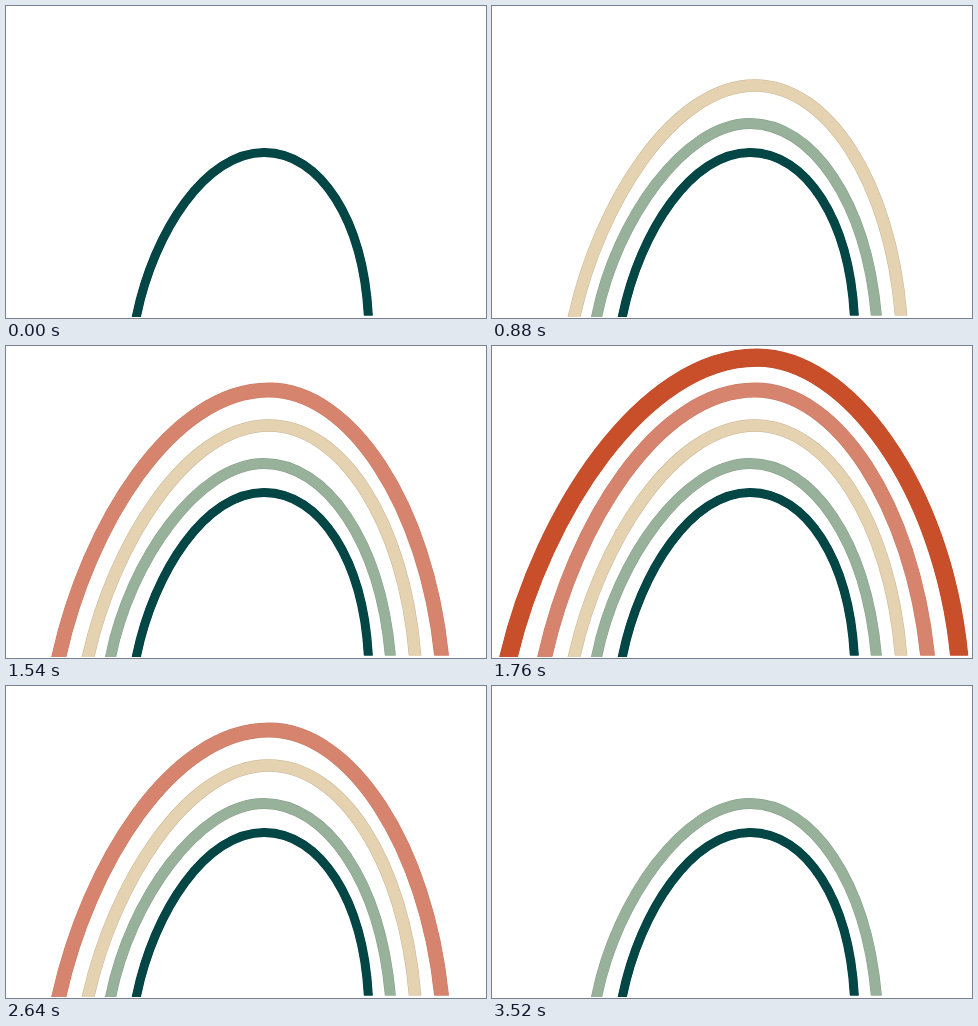
Write an HTML page that moves like this. It is 480 px wide and 312 px high and loops after 3.96 s.

```html
<!DOCTYPE html>
<html lang="en">
<head>
<meta charset="utf-8">
<title>Rainbow</title>
<style>
  html, body { margin: 0; width: 100%; height: 100%; overflow: hidden; background: #fff; }
  svg { display: block; width: 100%; height: 100%; }
  path { fill: none; }
</style>
</head>
<body>
<svg id="stage" viewBox="0 0 480 312">
  <clipPath id="ground"><path d="M0 0H480V309.6H250V311H0Z"/></clipPath>
  <g id="bows" clip-path="url(#ground)"></g>
</svg>
<script>
const LOOP = 3960;
const NS = "http://www.w3.org/2000/svg";

// Centre line: left foot, two handles, crown, two handles, right foot.
const bows = [
  { fill: "#034646", edge: "#033f40", width: 9, from: 0, to: LOOP,
    line: [130.5, 310, 148, 225, 200, 146.5, 258, 146.5, 315, 146.5, 357, 215, 362.3, 309] },
  { fill: "#98b19b", edge: "#879f8a", width: 11, from: 440, to: LOOP,
    line: [104.8, 310, 124, 215, 192, 117.5, 258, 117.5, 320, 117.5, 374, 195, 384.3, 309] },
  { fill: "#e5d2b1", edge: "#c9b595", width: 12.6, from: 880, to: 3520,
    line: [82.3, 310, 107, 200, 180, 79.5, 263, 79.5, 335, 79.5, 398, 175, 409, 309] },
  { fill: "#d6846d", edge: "#c67a64", width: 14.8, from: 1320, to: 3080,
    line: [53, 310, 82, 180, 165, 44, 263, 44, 345, 44, 420, 160, 435.5, 309] },
  { fill: "#c94f2b", edge: "#bd4a29", width: 18.2, from: 1760, to: 2640,
    line: [16.8, 310, 50, 170, 150, 11.7, 265, 11.7, 355, 11.7, 450, 140, 467, 308] }
];

// Runs both feet on below the ground line so that they are cut level.
function pathOf(p) {
  const past = (x, y, hx, hy) => [x + (x - hx) * 0.1, y + (y - hy) * 0.1];
  const start = past(p[0], p[1], p[2], p[3]);
  const end = past(p[12], p[13], p[10], p[11]);
  return `M${start}L${p.slice(0, 2)}C${p.slice(2, 8)}C${p.slice(8)}L${end}`;
}

function addStroke(parent, d, color, width) {
  const path = document.createElementNS(NS, "path");
  path.setAttribute("d", d);
  path.setAttribute("stroke", color);
  path.setAttribute("stroke-width", width);
  parent.appendChild(path);
}

for (const bow of bows) {
  const d = pathOf(bow.line);
  bow.node = document.createElementNS(NS, "g");
  addStroke(bow.node, d, bow.edge, bow.width);
  addStroke(bow.node, d, bow.fill, bow.width - 1);
  document.getElementById("bows").appendChild(bow.node);
}

function draw(time) {
  const t = time % LOOP;
  for (const { node, from, to } of bows) {
    node.setAttribute("visibility", t >= from && t < to ? "visible" : "hidden");
  }
}

const begin = performance.now();
function tick() {
  draw(performance.now() - begin);
  requestAnimationFrame(tick);
}
tick();
</script>
</body>
</html>
```
